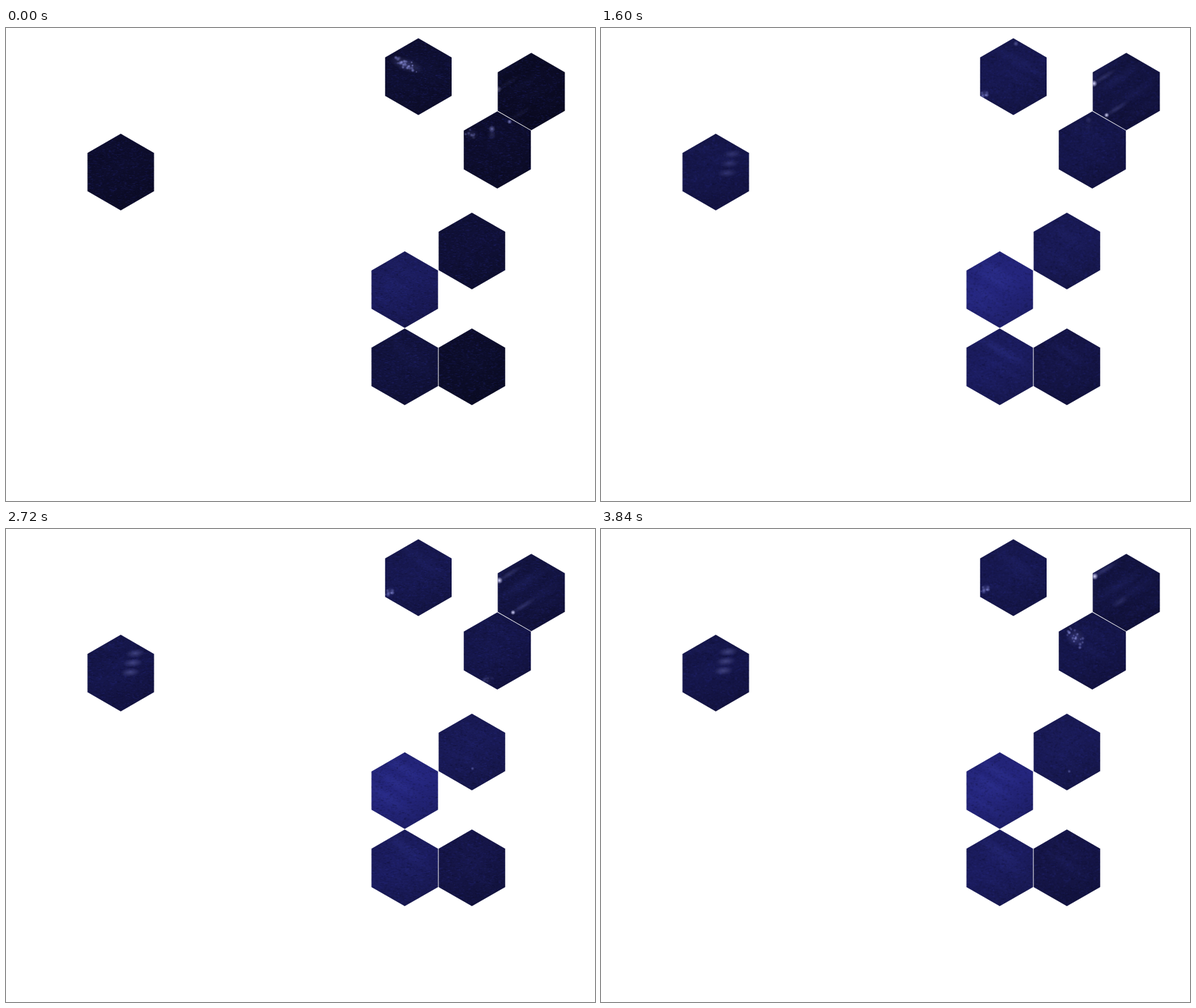
Recreate the animation shown at these times as an HTML page with a canvas. Size 834 by 671 pixels, loop 3880 ms.

```html
<!DOCTYPE html>
<html lang="en">
<head>
<meta charset="utf-8">
<title>Night sky hexagons</title>
<style>
html, body { margin: 0; width: 834px; height: 671px; overflow: hidden; background: #fff; }
canvas { display: block; }
</style>
</head>
<body>
<canvas id="stage" width="834" height="671"></canvas>
<script>
const LOOP = 3880, STEP = 40, FADE_IN = 800;
const ctx = document.getElementById('stage').getContext('2d');

const mix = (a, b, k) => a + (b - a) * k;
const clamp = k => Math.max(0, Math.min(1, k));
const blue = v => `rgb(${v * 0.29},${v * 0.3},${v})`;

function seeded(seed) {
  return () => (seed = (seed * 16807) % 2147483647) / 2147483647;
}

// Straight drift over the whole loop
const drift = (t, from, to) => from.map((v, i) => mix(v, to[i], t / LOOP));

// Opacity that swells around one moment
const swell = (t, peak, width) => Math.exp(-(((t - peak) / width) ** 2));

function glow([x, y], alpha, r, squash = 1, tilt = 0, rgb = '150,155,235') {
  if (alpha < 0.005) return;
  ctx.save();
  ctx.translate(x, y);
  ctx.rotate(tilt);
  ctx.scale(1, squash);
  const g = ctx.createRadialGradient(0, 0, 0, 0, 0, r);
  g.addColorStop(0, `rgba(${rgb},${alpha})`);
  g.addColorStop(0.5, `rgba(${rgb},${alpha * 0.5})`);
  g.addColorStop(1, `rgba(${rgb},0)`);
  ctx.fillStyle = g;
  ctx.fillRect(-r, -r, 2 * r, 2 * r);
  ctx.restore();
}

function cluster([x, y], alpha, count, w, h, slope = 0) {
  if (alpha < 0.005) return;
  const rnd = seeded(count * 977 + w);
  glow([x, y], alpha * 0.35, w, h / w, slope);
  for (let i = 0; i < count; i++) {
    const dx = (rnd() + rnd() - 1) * w, dy = (rnd() + rnd() - 1) * h;
    glow([x + dx, y + dy + dx * slope], alpha * mix(0.4, 1, rnd()), mix(1.5, 3.5, rnd()));
  }
}

function comet([x, y], alpha, r) {
  glow([x + 14, y - 9], alpha * 0.2, 22, 0.2, -0.56);
  glow([x, y], alpha, r, 1, 0, '215,215,255');
}

function skyTop(t) {
  cluster([567, 52], 0.75 * swell(t, 0, 450), 26, 26, 10, 0.35);
  cluster(drift(t, [542, 100], [545, 84]), 0.65 * clamp(t / 1200), 7, 7, 6);
  glow(drift(t, [587, 28], [588, 14]), 0.6 * swell(t, 1300, 550), 4);
}

function comets(t) {
  const shine = clamp(0.35 + t / 1800);
  comet(drift(t, [697, 87], [699, 67]), shine, 5);
  comet(drift(t, [713, 131], [720, 113]), shine * clamp((3600 - t) / 700), 3.6);
  glow([735, 103], 0.15 * swell(t, LOOP, 500), 14, 0.4, -0.56);
}

function sparks(t) {
  const [x, y] = drift(t, [688, 143], [694, 112]);
  glow([x, y], 0.7 * swell(t, 400, 1000), 5);
  glow([x, y + 8], 0.2 * swell(t, 400, 1000), 6, 1.4);
  glow([713, 133], 0.8 * swell(t, 0, 300), 3.5);
  cluster([659, 151], 0.4 * swell(t, 0, 400), 9, 10, 8);
  cluster(drift(t, [640, 180], [700, 228]), 0.65 * swell(t, 2350, 350), 8, 8, 8);
  cluster([672, 154], 0.6 * swell(t, LOOP, 500), 20, 14, 13, 0.3);
}

function dashes(t) {
  const [x, y] = drift(t, [190, 182], [180, 174]);
  for (let i = 0; i < 3; i++) {
    glow([x - i * 3.5, y + i * 13.5], 0.32 * clamp(t / 2500), 14, 0.45, -0.1);
  }
}

function dot(t) {
  glow(drift(t, [655, 330], [663, 344]), 0.45 * clamp((t - 1900) / 600), 2.6);
}

// level: blue of the paint; band: strength of its lighter streaks
const W = 47.1, X = 564.6, Y = 316.3, ROW = 54.8;
const cells = [
  { x: 583.9, y: 69, level: 76, marks: skyTop },
  { x: 743.8, y: 90.2, w: 47.5, level: 62, band: 0.2, tilt: -0.56, marks: comets },
  { x: 695.7, y: 173, w: 47.5, level: 70, marks: sparks },
  { x: 162.5, y: 204.4, level: 70, tilt: -0.1, marks: dashes },
  { x: X + 95.1, y: Y, level: 82, marks: dot },
  { x: X, y: Y + ROW, level: 118, band: 0.24 },
  { x: X, y: Y + 3 * ROW, level: 90, band: 0.16 },
  { x: X + 95.1, y: Y + 3 * ROW, level: 68 }
];

// Fine painterly strokes shared by all cells
function makeGrain(size) {
  const tile = document.createElement('canvas');
  tile.width = tile.height = size;
  const g = tile.getContext('2d'), rnd = seeded(4211);
  for (let i = 0; i < 6000; i++) {
    const a = 0.06 + rnd() * 0.22;
    g.fillStyle = rnd() < 0.5 ? `rgba(6,6,26,${a})` : `rgba(50,54,160,${a})`;
    g.fillRect(rnd() * size, rnd() * size, 1 + rnd() * 3, 1);
  }
  return ctx.createPattern(tile, 'repeat');
}
const grain = makeGrain(160);

function hexagon(x, y, w) {
  ctx.beginPath();
  for (let i = 0; i < 6; i++) {
    const a = (i + 0.5) * Math.PI / 3, r = w / Math.cos(Math.PI / 6);
    ctx.lineTo(x + r * Math.cos(a), y + r * Math.sin(a));
  }
  ctx.closePath();
}

// Broad soft bands that slide across the paint
function streaks(x, y, band, tilt, seed, t) {
  const rnd = seeded(seed * 71 + 13);
  for (let i = 0; i < 4; i++) {
    const off = -34 + i * 19 + 4 * Math.sin(t / 600 + i * 2);
    const at = [x - off * Math.sin(tilt) + (rnd() - 0.6) * 40, y + off * Math.cos(tilt)];
    glow(at, band * mix(0.5, 1, rnd()) * (1 - i * 0.18), 48, 0.2, tilt, '75,85,205');
  }
}

function drawGrain(x, y, i, t) {
  const ox = i * 47, oy = i * 31 - t / 250;
  ctx.save();
  ctx.globalAlpha = 0.75;
  ctx.translate(ox, oy);
  ctx.fillStyle = grain;
  ctx.fillRect(x - 60 - ox, y - 60 - oy, 120, 120);
  ctx.restore();
}

function drawCell({ x, y, w = W, level, band = 0.08, tilt = 0.55, marks }, i, t) {
  const rise = clamp(t / FADE_IN);
  const paint = level * mix(0.36 + level / 300, 1, rise * (2 - rise));
  const fill = ctx.createLinearGradient(x - 22, y - 45, x + 22, y + 45);
  fill.addColorStop(0, blue(paint));
  fill.addColorStop(0.45, blue(paint * 1.05));
  fill.addColorStop(1, blue(paint * 0.88));

  ctx.save();
  hexagon(x, y, w);
  ctx.clip();
  ctx.fillStyle = fill;
  ctx.fillRect(x - 60, y - 60, 120, 120);
  streaks(x, y, band * mix(0.4, 1, rise), tilt, i, t);
  drawGrain(x, y, i, t);
  if (marks) marks(t);
  ctx.restore();
}

function draw() {
  const t = Math.floor(performance.now() / STEP) * STEP % LOOP;
  ctx.fillStyle = '#fff';
  ctx.fillRect(0, 0, 834, 671);
  cells.forEach((cell, i) => drawCell(cell, i, t));
  requestAnimationFrame(draw);
}
draw();
</script>
</body>
</html>
```
